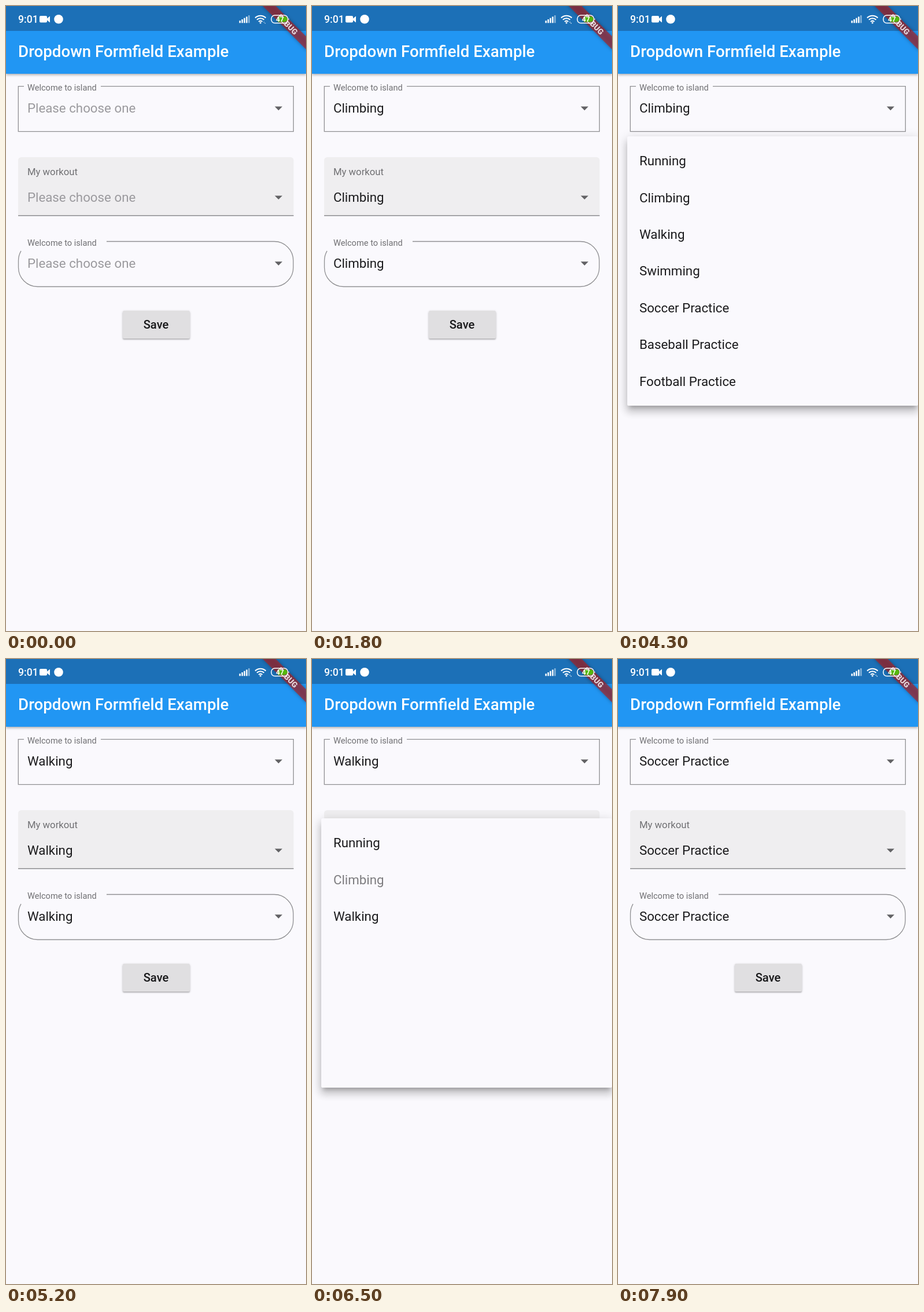
These frames come from a looping animation (519x1079 px, 8000 ms). An HTML page:

```html
<!DOCTYPE html>
<html lang="en">
<head>
<meta charset="utf-8">
<style>
html, body { margin: 0; width: 100%; height: 100%; overflow: hidden; background: #faf9fd; }
body { position: relative; font-family: Roboto, sans-serif; }
svg { position: absolute; left: 0; top: 0; display: block; }
.bar { position: absolute; left: 0; top: 0; width: 519px; height: 116.5px; background: #2196f3;
  box-shadow: 0 2px 4px rgba(0,0,0,.22), 0 1px 6px rgba(0,0,0,.14); }
.status { height: 42.5px; background: #1c70b7; }
.save { position: absolute; left: 201.5px; top: 526.3px; width: 116.5px; height: 47.5px; border-radius: 2.6px;
  background: #e0dfe1; box-shadow: 0 2px 2px rgba(0,0,0,.2), 0 1px 4px rgba(0,0,0,.14); }
#menu { position: absolute; left: 16px; width: 503px; }
#panel { position: absolute; left: 0; width: 100%; border-radius: 2.6px; background: #faf9fd;
  box-shadow: 0 6.6px 6.6px -4px rgba(0,0,0,.2), 0 10.6px 13.2px 1.3px rgba(0,0,0,.14), 0 4px 18.5px 2.6px rgba(0,0,0,.12); }
.line { fill: none; stroke: #8f8f92; stroke-width: 1.3; }
.value { font-size: 22.3px; fill: #1b1b1d; }
.label { font-size: 14.64px; fill: #707073; }
</style>
</head>
<body>
<div class="bar"><div class="status"></div></div>
<div class="save"></div>

<svg width="519" height="1079">
  <text x="21.1" y="88" font-size="27.7" font-weight="500" fill="#fff">Dropdown Formfield Example</text>
  <path class="line" d="M31 138.6H21.3V216.6H497.3V138.6H164"/>
  <text class="label" x="36.9" y="146">Welcome to island</text>
  <path fill="#efeef0" d="M21 362V266.3a5.3 5.3 0 0 1 5.3-5.3H492.3a5.3 5.3 0 0 1 5.3 5.3V362z"/>
  <path class="line" style="stroke:#77777a" d="M21 361.8H497.6"/>
  <text class="label" style="font-size:16.73px" x="36.9" y="292.4">My workout</text>
  <path class="line" d="M174 406.5H464a33 33 0 0 1 33 33V451.5a33 33 0 0 1 -33 33H54.5a33 33 0 0 1 -33 -33V439.5A33 33 0 0 1 26 422.9"/>
  <text class="label" x="36.9" y="414">Welcome to island</text>
  <text x="259.5" y="557.4" text-anchor="middle" font-size="20.2" font-weight="500" fill="#171719">Save</text>
  <g id="fields"></g>
</svg>

<div id="menu">
  <div id="panel"></div>
  <svg id="items" width="503" height="466"></svg>
</div>

<svg width="519" height="120">
  <g transform="translate(519) rotate(45)">
    <rect x="-56" y="37" width="112" height="15.9" fill="#b71c1c" fill-opacity=".63" style="filter:drop-shadow(0 0 3px rgba(0,0,0,.5))"/>
    <text x="0" y="49.8" text-anchor="middle" font-size="13.5" font-weight="900" fill="#fff" fill-opacity=".8">DEBUG</text>
  </g>
  <g fill="#fff">
    <text x="21" y="29" font-size="17.6" font-weight="500">9:01</text>
    <path d="M60 17h9a2 2 0 0 1 2 2v2.5l5-4v11l-5-4v2a2 2 0 0 1 -2 2h-9a2 2 0 0 1 -2-2v-7.500a2 2 0 0 1 2-2z"/>
    <circle cx="91" cy="22.700" r="7.800"/>
    <g id="signal"></g>
    <g fill="none" stroke="#fff" stroke-width="2">
      <path d="M431 20.500a13 13 0 0 1 18.500 0M434 23.800a9 9 0 0 1 12.500 0M437 27a5 5 0 0 1 6.500 0"/>
    </g>
    <circle cx="440.200" cy="29" r="1.500"/>
    <path id="traffic" d="M445 28.500l1.200-2 1.200 2zM447 29l1.200 2 1.200-2z"/>
    <rect x="459" y="16" width="28.500" height="13.500" rx="6" fill="none" stroke="#fff" stroke-width="1.500"/>
    <path d="M470 18H482a4.700 4.700 0 0 1 0 9.500H470z" fill="#55b70d"/>
    <path d="M488.700 20.500q2 2.300 0 4.600z"/>
    <text x="474" y="27" text-anchor="middle" font-size="12" font-weight="700">47</text>
  </g>
</svg>

<script>
const LOOP = 8000, STEP = 100;
const DP = 519 / 392.73, ROW = 48 * DP, PAD = 8 * DP;
const names = ['Running', 'Climbing', 'Walking', 'Swimming', 'Soccer Practice', 'Baseball Practice', 'Football Practice'];
const HEIGHT = names.length * ROW + 2 * PAD;
const centers = [176.6, 330.5, 444.3];

// Each visit opens one field's menu; "fade" is the length of the closing fade.
const visits = [
  { field: 0, from: 0, open: 400, close: 1800, fade: 0, pick: 1 },
  { field: 1, from: 1, open: 3980, close: 5100, fade: 100, pick: 2 },
  { field: 2, from: 2, open: 6300, close: 7600, fade: 100, pick: 4 }
];

const $ = id => document.getElementById(id);
const ramp = (t, a, b) => Math.min(1, Math.max(0, (t - a) / (b - a)));

function add(parent, tag, attrs, text = '') {
  const el = document.createElementNS('http://www.w3.org/2000/svg', tag);
  for (const k in attrs) el.setAttribute(k, attrs[k]);
  el.textContent = text;
  parent.append(el);
  return el;
}

for (let i = 0; i < 5; i++) {
  const h = 4 + i * 2.3;
  add($('signal'), 'rect', { x: 403.5 + i * 3.9, y: 29.3 - h, width: 2.5, height: h, opacity: i < 4 ? 1 : .5 });
}

const values = centers.map(y => {
  add($('fields'), 'path', { d: `M464.900 ${y - 3}h13.200l-6.600 6.600z`, fill: '#626265' });
  return add($('fields'), 'text', { class: 'value', x: 36.9, y: y + 7.8 });
});
const items = names.map((name, i) =>
  add($('items'), 'text', { class: 'value', x: 20.9, y: PAD + (i + .5) * ROW + 7.9 }, name));

function drawMenu(v, time) {
  $('menu').style.display = v ? '' : 'none';
  if (!v) return;
  const p = ramp(time, v.open, v.open + 300);
  const grow = ramp(p, .25, .5);
  const start = PAD + v.from * ROW;
  const top = start * (1 - grow);
  const bottom = start + ROW + (HEIGHT - start - ROW) * grow;
  $('menu').style.top = centers[v.field] - start - ROW / 2 + 'px';
  $('menu').style.opacity = time < v.close ? ramp(p, 0, .25) : .5;
  $('panel').style.top = top + 'px';
  $('panel').style.height = bottom - top + 'px';
  const unit = .5 / (names.length + 1.5);
  items.forEach((el, i) => {
    const a = .5 + (i + 1) * unit;
    el.setAttribute('opacity', i === v.from ? 1 : ramp(p, a, Math.min(1, a + 1.5 * unit)));
  });
}

function draw(now) {
  const time = Math.floor(now % LOOP / STEP) * STEP;
  const last = visits.filter(v => time >= v.close).pop();
  for (const el of values) {
    el.textContent = last ? names[last.pick] : 'Please choose one';
    el.style.fill = last ? '' : '#9b9a9e';
  }
  drawMenu(visits.find(v => time >= v.open && time < v.close + v.fade), time);
  $('traffic').setAttribute('opacity', time < 900 ? .6 : time >= 4000 && time < 6200 ? 0 : .8);
  requestAnimationFrame(draw);
}
draw(0);
</script>
</body>
</html>
```
